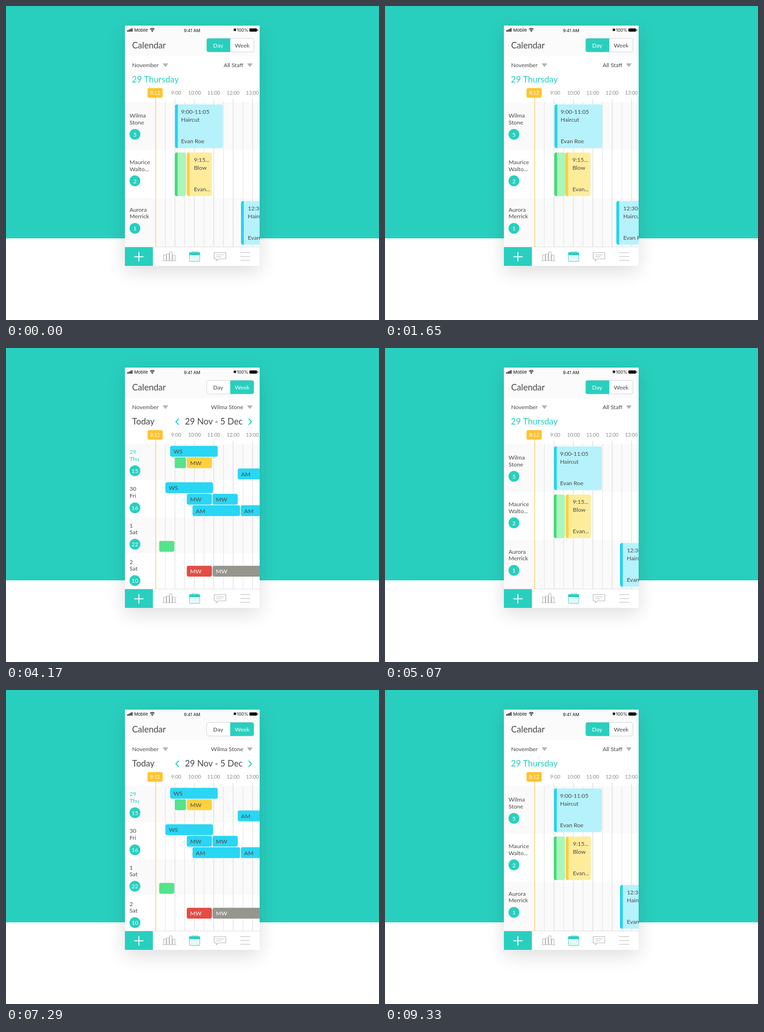
These frames come from a looping animation (800 by 673 pixels, 9.36 s). An HTML page:

```html
<!DOCTYPE html>
<html lang="en">
<head>
<meta charset="utf-8">
<title>Salon calendar</title>
<style>
  html, body { margin: 0; width: 100%; height: 100%; overflow: hidden; background: #fff; }
  svg { display: block; width: 800px; height: 673px; }
  text { font-family: Lato, "Open Sans", sans-serif; font-size: 12.33px; fill: #484848; }
  .big { font-size: 18.5px; }
  .hour { font-size: 10.8px; fill: #8c8c8c; }
  .status { font-family: Inter, Roboto, sans-serif; font-size: 9.2px; fill: #111; }
  .mid { text-anchor: middle; }
  .end { text-anchor: end; }
  .teal { fill: #29cfbe; }
  .white { fill: #fff; }
  .icon { fill: none; stroke: #b4b4b4; stroke-width: 1.2; }
</style>
</head>
<body>
<svg viewBox="0 0 800 673">
  <defs>
    <filter id="blur" x="-40%" y="-30%" width="180%" height="160%"><feGaussianBlur stdDeviation="20"/></filter>
    <clipPath id="screen"><rect x="255" y="42" width="289" height="474"/></clipPath>
  </defs>
  <rect class="teal" width="800" height="498"/>
  <rect x="255" y="54" width="289" height="515" opacity=".13" filter="url(#blur)"/>
  <rect class="white" x="255" y="42" width="289" height="515"/>
  <rect x="255" y="42" width="289" height="65" fill="#fbfbfb"/>

  <g id="statusBar">
    <path d="M261.2 55v-3M264.2 55v-4.5M267.2 55v-6M270.2 55v-7.5" stroke="#111" stroke-width="2"/>
    <text class="status" x="275" y="55">Mobile</text>
    <g fill="none" stroke="#111" stroke-width="1.5">
      <path d="M309 50a6.4 6.4 0 0 1 9.4 0M311 52.2a3.8 3.8 0 0 1 5.4 0"/>
    </g>
    <circle cx="313.7" cy="54.2" r="1.2" fill="#111"/>
    <text class="status mid" x="399" y="55.5">9:41 AM</text>
    <rect x="488.5" y="48.5" width="5" height="5" fill="#111"/>
    <text class="status end" x="519.5" y="55">100%</text>
    <rect x="522" y="48" width="16.5" height="7" rx="1.8" fill="#111"/>
    <path d="M540 50v3" stroke="#111" stroke-width="1.4"/>
  </g>

  <text class="big" x="270.5" y="91">Calendar</text>
  <rect x="430.5" y="69.5" width="101" height="29" rx="4" fill="#fff" stroke="#d3d3d3"/>
  <text class="mid" x="455" y="89">Day</text>
  <text class="mid" x="506.5" y="89">Week</text>
  <g id="dayOn">
    <path class="teal" d="M481 69.5h-46.5a4 4 0 0 0-4 4v21a4 4 0 0 0 4 4h46.5z"/>
    <text class="mid white" x="455" y="89">Day</text>
  </g>
  <g id="weekOn">
    <path class="teal" d="M481 69.5h46.5a4 4 0 0 1 4 4v21a4 4 0 0 1-4 4h-46.5z"/>
    <text class="mid white" x="506.5" y="89">Week</text>
  </g>

  <text x="270.5" y="130.7">November</text>
  <path d="M336 123h12l-6 8zM517 123h12l-6 8z" fill="#b3b3b3"/>
  <text id="allStaff" class="end" x="509" y="130.7">All Staff</text>
  <text id="oneStaff" class="end" x="509" y="130.7">Wilma Stone</text>
  <text id="dayTitle" class="big teal" x="270" y="164">29 Thursday</text>
  <g id="weekTitle">
    <text class="big" x="270.5" y="164">Today</text>
    <text class="big mid" x="445.7" y="164">29 Nov - 5 Dec</text>
    <path d="M370.5 151.5l-6 6.5 6 6.5M520.5 151.5l6 6.5-6 6.5" fill="none" stroke="#29cfbe" stroke-width="2.2"/>
  </g>

  <g clip-path="url(#screen)">
    <g id="dayBands" fill="#fafafa"><path d="M255 206h289v102h-289zM255 412h289v104h-289z"/></g>
    <g id="weekBands" fill="#fafafa"><path d="M255 206h289v77h-289zM255 363h289v77h-289z"/></g>
    <g id="grid"></g>
    <g id="dayLabels"></g>
    <g id="weekLabels"></g>
    <path d="M321.2 196v320" stroke="#f6ca55" stroke-width="1.3"/>
    <rect x="303.5" y="176" width="32.5" height="20.5" rx="3.5" fill="#ffc32e"/>
    <text class="hour white mid" style="fill:#fff" x="319.7" y="190.3">8:12</text>
    <g id="events"></g>
  </g>

  <g id="tabBar">
    <rect class="white" x="255" y="516" width="289" height="41"/>
    <path d="M255 516.5h289" stroke="#dcdcdc"/>
    <rect class="teal" x="255" y="517" width="60" height="40"/>
    <path d="M275 537.5h20M285 527.5v20" stroke="#fff" stroke-width="2"/>
    <g class="icon">
      <path d="M335.5 546h30M338.5 546v-12.500h5v12.500M344.800 546v-14.500h5v14.500M351 546v-19h5v19M357.500 546v-12h5v12"/>
      <path d="M446.500 528.500h25v13.500h-16l-4.500 4v-4h-4.500zM451 533.500h16M451 537.500h11M502.500 528.500h21M502.500 537h21M502.500 545h21"/>
    </g>
    <rect x="393.500" y="528.500" width="22" height="19" rx="1" fill="#fff" stroke="#29cfbe"/>
    <path class="teal" d="M393 528h23v6h-23z"/>
    <path d="M399 529.300h12" stroke="#29cfbe" stroke-width="7" stroke-dasharray="1.500 2"/>
    <path d="M396.500 537.500h17M396.500 541h17M396.500 544.500h17" stroke="#29cfbe" stroke-dasharray="1.300 1.700"/>
  </g>
</svg>
<script>
const LOOP = 9360, STEP = 30, SLIDE = 289;
// [start in ms, week view?]
const SWITCHES = [[100, 1], [1180, 0], [2745, 1], [4270, 0], [5765, 1], [7330, 0]];
const CYAN = '#29d6f3', GREEN = '#55e38c', YELLOW = '#ffd13d', RED = '#e24d45', GREY = '#96968e';
const $ = id => document.getElementById(id);
const text = (x, y, s, cls = '', fill = '') =>
  `<text x="${x}" y="${y}" class="${cls}"${fill && ` style="fill:${fill}"`}>${s}</text>`;

// Time grid
let grid = '';
for (let i = 0; i < 10; i++) {
  const x = 341.6 + i * 20.8, hour = i % 2;
  grid += `<path d="M${x} ${hour ? 199 : 206}V516" stroke="${hour ? '#dadada' : '#e4e4e4'}" stroke-width="1.2"/>`;
}
[365, 404.5, 445.5, 487, 528.5].forEach((x, i) => grid += text(x, 190.3, `${9 + i}:00`, 'hour mid'));
$('grid').innerHTML = grid;

// Row labels with a count badge
const label = (y, top, bottom, count, badge, cls) =>
  text(265, y, top, cls) + text(265, y + 14.8, bottom, cls) +
  `<circle class="teal" cx="276.5" cy="${y + badge}" r="11.6"/>` +
  text(276.5, y + badge + 4.8, count, 'mid white');
$('dayLabels').innerHTML =
  label(239, 'Wilma', 'Stone', 5, 36) +
  label(338.7, 'Maurice', 'Walto...', 2, 36) +
  label(440.5, 'Aurora', 'Merrick', 1, 36);
$('weekLabels').innerHTML =
  label(227, '29', 'Thu', 15, 36, 'teal') +
  label(306, '30', 'Fri', 16, 36.5) +
  label(384.5, '1', 'Sat', 22, 36) +
  label(462.5, '2', 'Sat', 10, 36);

const movers = [];
function addEvent(week, delay, html, slide = SLIDE) {
  const el = document.createElementNS('http://www.w3.org/2000/svg', 'g');
  el.innerHTML = html;
  $('events').append(el);
  movers.push({ el, week, delay, slide });
}

function card(delay, x, y, w, light, dark, lines = [], pad = 13) {
  const rows = [[20, lines[0]], [37, lines[1]], [83, lines[2]]];
  addEvent(0, delay,
    `<rect x="${x}" y="${y}" width="${w}" height="93.5" rx="4.5" fill="${light}"/>` +
    `<path d="M${x + 6} ${y}h-1.500a4.500 4.500 0 0 0-4.500 4.500v84.500a4.500 4.500 0 0 0 4.500 4.500h1.500z" fill="${dark}"/>` +
    (lines.length ? rows.map(([dy, s]) => text(x + pad, y + dy, s)).join('') : ''));
}
card(0, 362.5, 211, 102.5, '#b6f2fc', '#25d2f2', ['9:00-11:05', 'Haircut', 'Evan Roe']);
card(0, 362, 314, 24, '#abf6b9', '#45da7e');
card(.045, 387.7, 314, 54, '#ffec9b', '#ffce3c', ['9:15...', 'Blow', 'Evan...'], 15.3);
card(.105, 504, 418, 102.5, '#b6f2fc', '#25d2f2', ['12:30-14:35', 'Haircut', 'Evan Roe'], 14.7);

function bar(delay, x, y, w, fill, name = '', slide) {
  const ink = fill === RED || fill === GREY ? '#fff' : '';
  addEvent(1, delay,
    `<rect x="${x}" y="${y}" width="${w}" height="23.300" rx="4" fill="${fill}"/>` +
    text(x + 7.3, y + 16.7, name, '', ink), slide);
}
bar(.08, 352, 209.7, 102, CYAN, 'WS', 195);
bar(0, 362, 234.3, 24, GREEN);
bar(.065, 387.7, 234.3, 54, YELLOW, 'MW');
bar(0, 497, 258.300, 102, CYAN, 'AM');
bar(.06, 342, 287.7, 102, CYAN, 'WS');
bar(.065, 387.7, 312.4, 54, CYAN, 'MW');
bar(.108, 443, 312.4, 54, CYAN, 'MW');
bar(.065, 400, 337, 102, CYAN, 'AM');
bar(.105, 503.5, 337, 102, CYAN, 'AM');
bar(.03, 328.5, 413.4, 32.500, GREEN);
bar(.065, 387.7, 466.7, 54, RED, 'MW');
bar(.12, 443, 466.7, 150, GREY, 'MW');

// [id, week?, delay of fade in, delay of fade out] in seconds
const FADES = [
  ['dayOn', 0, .145, .145], ['weekOn', 1, .145, .145],
  ['allStaff', 0, .21, 0], ['oneStaff', 1, .21, 0],
  ['dayTitle', 0, 0, .175], ['weekTitle', 1, 0, .175],
  ['dayLabels', 0, .185, 0], ['weekLabels', 1, .185, 0],
  ['dayBands', 0, .185, 0], ['weekBands', 1, .185, 0]
].map(([id, ...rest]) => [$(id), ...rest]);

// Remaining distance of a spring with tension 250 and friction 20
function spring(t) {
  const w = Math.sqrt(150);
  return Math.exp(-10 * t) * (Math.cos(w * t) + 10 / w * Math.sin(w * t));
}

// How far the given view is shown: 0 hidden, 1 in place
function shown(ms, week, delayIn, delayOut = delayIn) {
  let v = week ? 0 : 1;
  for (const [start, toWeek] of SWITCHES) {
    const enter = toWeek === week;
    const t = (ms - start) / 1000 - (enter ? delayIn : delayOut);
    if (t >= 0) v = enter ? 1 - spring(t) : spring(t);
  }
  return v;
}

function draw() {
  const ms = Math.floor(performance.now() % LOOP / STEP) * STEP;
  for (const { el, week, delay, slide } of movers) {
    const v = shown(ms, week, delay);
    // Parked events sit fully beyond the right edge
    const reach = v < .5 ? SLIDE : slide;
    el.setAttribute('transform', `translate(${(reach * (1 - v)).toFixed(2)} 0)`);
  }
  for (const [el, week, delayIn, delayOut] of FADES)
    el.setAttribute('opacity', Math.min(1, Math.max(0, shown(ms, week, delayIn, delayOut))).toFixed(3));
  requestAnimationFrame(draw);
}
draw();
</script>
</body>
</html>
```
